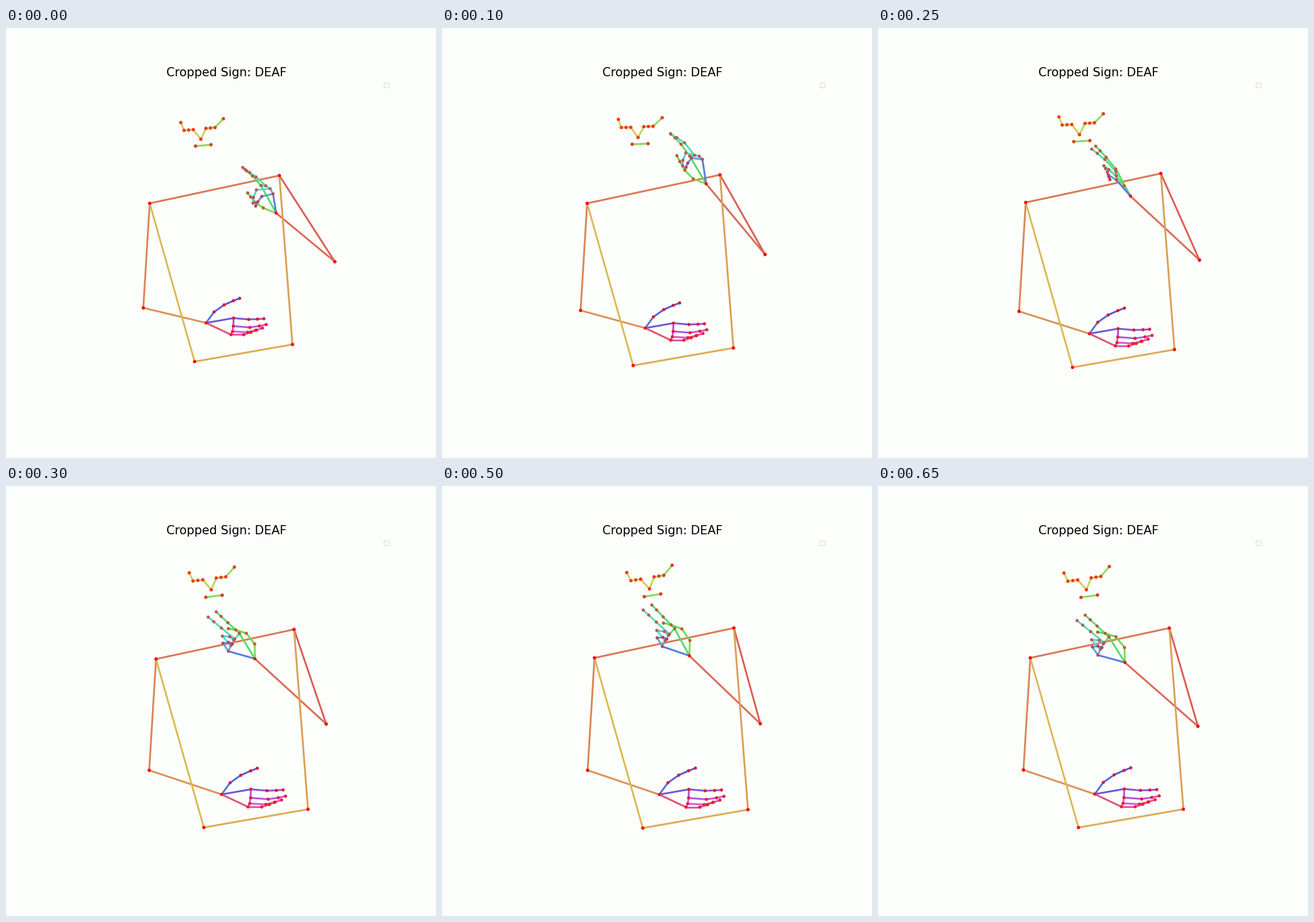
Animation of 748x748 px, one loop 0.7 s. Source, as a matplotlib script:

```python
import colorsys

import numpy as np
import matplotlib.pyplot as plt
from matplotlib.animation import FuncAnimation
from matplotlib.collections import LineCollection
from matplotlib.patches import FancyBboxPatch

SIZE, DPI = 748, 88
PX = 72 / DPI                       # points per pixel
FRAMES, INTERVAL = 14, 50
BACKGROUND = "#fcfefb"

# Key times; the touch is held from the fifth to the sixth.
KEY_TIMES = np.array([0, 2, 4, 6, 8, 10, 13])
KEY_ORDER = [0, 1, 2, 3, 4, 4, 5]

# The signer comes a little closer to the camera and tilts the head.
SCALE = [0.93, 0.953, 0.948, 0.99, 1, 0.997]
TILT = [-4.5, -1.5, 0, -6.5, -8.5, -7.5]
SHOULDER = [(250, 305), (252.5, 305), (253, 306), (261, 301), (265.3, 299), (265, 299)]
NOSE = [(339, 193.5), (341, 190.5), (344, 190.5), (357, 180.5), (361, 179), (362.5, 180.5)]
ELBOW = [(572, 406.5), (562, 394), (561.5, 393.5), (557, 414), (553.7, 413.5), (556.5, 418)]
SIGN_WRIST = [(470, 322), (459.5, 271), (445.5, 284.5), (433, 300.5), (430.2, 295.2), (429.5, 307)]
REST_WRIST = [(348, 513), (353.5, 522), (360.5, 527), (375, 536.5), (378, 536.7), (377, 536)]


def place(shape, origin, scale=1.0, turn=0.0):
    """Scale a shape, turn it clockwise by degrees and move it."""
    c, s = np.cos(np.radians(turn)), np.sin(np.radians(turn))
    return np.asarray(shape) @ np.array([[c, s], [-s, c]]) * scale + origin


def finger(x, y, length, angle, curl, bones=(1, 0.58, 0.42)):
    """Four joints from the knuckle on: three shrinking bones, bent by curl."""
    angles = np.radians(angle + curl * np.array([0, 1, 1.25]))
    steps = length * np.array(bones)[:, None] * np.stack([np.cos(angles), np.sin(angles)], 1)
    return np.vstack([(x, y), (x, y) + np.cumsum(steps, axis=0)])


def hand(thumb, *fingers):
    """Wrist at the origin, then thumb and fingers."""
    return np.vstack([(0, 0), finger(*thumb, bones=(1, 0.82, 0.55))]
                     + [finger(*f) for f in fingers])


# Knuckle x, y, first bone's length, its direction, curl.
low = hand((-22.5, -9, 16, 215, 14), (-26.5, -48, 22.3, 228, -6), (-18, -47.5, 23, 222, -7),
           (-10.5, -42.5, 24, 175, -64), (-5.5, -33.5, 20, 167, -40))
raised = hand((-22.5, -8.5, 21, 226, 14), (-28.5, -48, 25.8, 234, -8), (-20, -49.5, 28, 231, -17),
              (-12, -48, 24, 194, -82), (-6.5, -42.5, 19, 187, -60))
turned = hand((1, -26.5, 24.5, 235, -34), (-25.5, -47, 28.6, 226, 0), (-34.5, -37.5, 31, 222.5, 0),
              (-42, -26, 23, 231, 137), (-47, -16, 17.5, 239, 116))
relaxed = hand((15, -20.5, 23, -35, 11), (51.5, -9, 28.4, 5, -7), (51, 6, 31, 4.5, -13),
               (49.5, 16, 28.5, 3, -17), (46.5, 22, 24, 0, -18))
# Shape, scale and turn of the signing hand at each key.
SIGNING = [(low, 1, 0), (raised, 1, 0), (raised, 1, 5),
           (turned, 0.965, -3), (turned, 1, 0), (turned, 0.98, -3.5)]

# Shoulder, elbow and hips, measured from the other shoulder.
torso = [(242.5, -52), (0, 0), (-12, 195.5), (267, 264), (84, 296)]

# Inner eye, eye, outer eye and ear on each side, measured from the nose.
face = [(0, 0), (-12.8, -19), (-21.4, -19), (-30, -19), (-35, -34),
        (11, -19.5), (19.5, -19.6), (28, -19.7), (45, -35), (-11, 12), (18, 11.7)]


def skeleton(k):
    shape, scale, turn = SIGNING[k]
    body = place(torso, SHOULDER[k], SCALE[k])
    return np.vstack([body[:2], ELBOW[k], body[2:],
                      place(face, NOSE[k], SCALE[k], TILT[k]),
                      place(shape, SIGN_WRIST[k], scale, turn),
                      place(relaxed, REST_WRIST[k], SCALE[k])])


joints = np.stack([skeleton(k) for k in KEY_ORDER])
COUNT = joints.shape[1]
FACE = 6
SIGN = FACE + len(face)
REST = SIGN + len(low)


def chain(*nodes):
    return list(zip(nodes, nodes[1:]))


def shifted(pairs, start):
    return [(a + start, b + start) for a, b in pairs]


body_edges = chain(0, 2, SIGN) + chain(0, 1, 3, REST) + chain(0, 4, 5) + [(1, 5)]
face_edges = chain(0, 1, 2, 3, 4) + chain(0, 5, 6, 7, 8) + [(9, 10)]
hand_edges = chain(0, 1, 2, 3, 4) + [(0, 5)]
for base in (5, 9, 13, 17):
    hand_edges += chain(*range(base, base + 4))
    hand_edges.append((base, base + 4) if base < 17 else (0, 17))
edges = np.array(body_edges + shifted(face_edges, FACE)
                 + shifted(hand_edges, SIGN) + shifted(hand_edges, REST))

HUES = 61
edge_colors = np.array([colorsys.hls_to_rgb((0.01 + i / HUES) % 1, 0.6, 0.65)
                        for i in range(len(edges))])

# Each joint is red, tinted by the first edge that reaches it.
RED = np.array([1, 0.02, 0.02])
redness = np.full(COUNT, 0.72)
redness[:FACE] = redness[[SIGN, REST]] = 0.93
redness[SIGN + 1:REST] = 0.58
dot_colors = np.zeros((COUNT, 3))
for ends, color in reversed(list(zip(edges, edge_colors))):
    for j in ends:
        dot_colors[j] = redness[j] * RED + (1 - redness[j]) * color
dot_px = np.where(np.arange(COUNT) < SIGN, 6, 5.6)

fig = plt.figure(figsize=(SIZE / DPI, SIZE / DPI), dpi=DPI, facecolor=BACKGROUND)
ax = fig.add_axes([0, 0, 1, 1])
ax.set(xlim=(0, SIZE), ylim=(SIZE, 0))
ax.axis("off")
ax.text(383.3, 83.5, "Cropped Sign: DEAF", ha="center", va="baseline",
        family="DejaVu Sans", size=20.83 * PX, color="black")
ax.add_patch(FancyBboxPatch((657.7, 95.7), 9, 8, boxstyle="round,pad=0,rounding_size=2",
                            fc=BACKGROUND, ec="#dadcda", lw=1.3 * PX))
bones = LineCollection([], colors=edge_colors, linewidths=3.2 * PX,
                       capstyle="projecting", zorder=2)
ax.add_collection(bones)
dots = ax.scatter(*joints[0].T, s=(dot_px * PX) ** 2, c=dot_colors, linewidths=0, zorder=3)


def pose(frame):
    k = min(np.searchsorted(KEY_TIMES, frame, side="right") - 1, len(KEY_TIMES) - 2)
    t = (frame - KEY_TIMES[k]) / (KEY_TIMES[k + 1] - KEY_TIMES[k])
    return joints[k] * (1 - t) + joints[k + 1] * t


def draw(frame):
    points = pose(frame)
    bones.set_segments(points[edges])
    dots.set_offsets(points)
    return bones, dots


anim = FuncAnimation(fig, draw, frames=FRAMES, interval=INTERVAL,
                     init_func=lambda: draw(0), repeat=True, repeat_delay=0)
plt.show()
```
